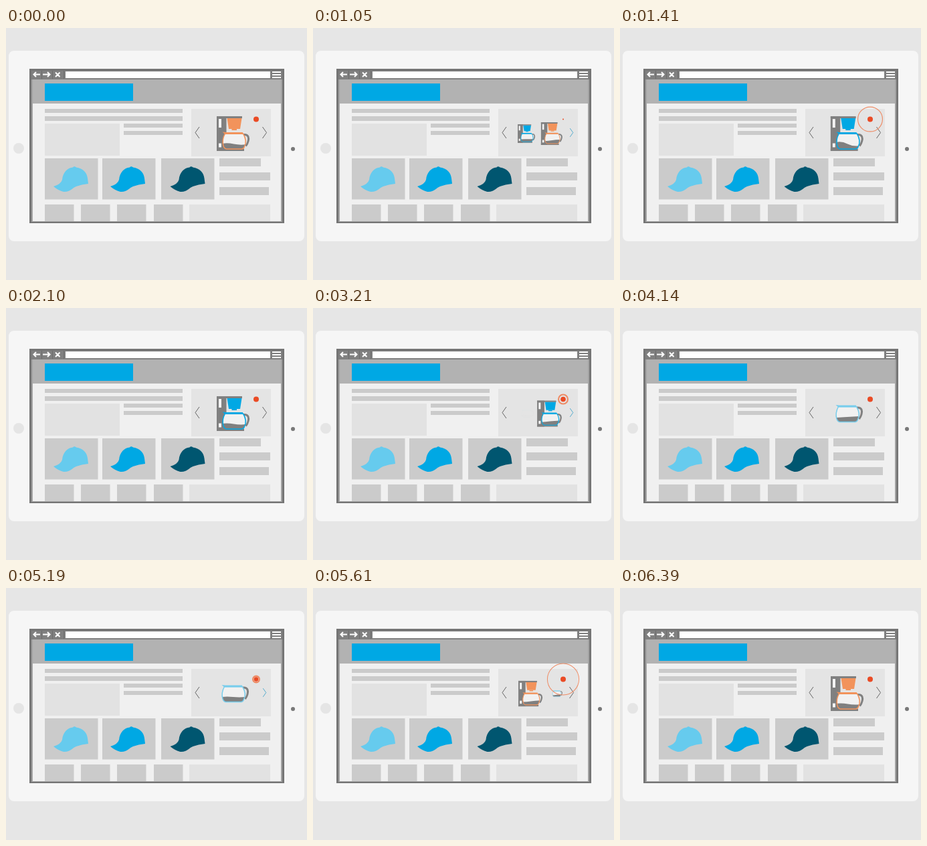
These frames come from a looping animation (450 px wide and 377 px high, 6420 ms). An HTML page with a canvas:

```html
<!DOCTYPE html>
<html>
<head>
<meta charset="utf-8">
<style>
html, body { margin: 0; width: 100%; height: 100%; overflow: hidden; background: #e6e6e6; }
canvas { display: block; }
</style>
</head>
<body>
<canvas id="stage" width="450" height="377"></canvas>
<script>
const c = document.getElementById('stage').getContext('2d');
const LOOP = 6420, GRAY = '#808080', BLUE = '#00a8e4', ORANGE = '#f2935b', PALE = '#78cdec';
const clamp = v => Math.max(0, Math.min(1, v));
const ease = v => (1 - Math.cos(Math.PI * clamp(v))) / 2;

function rect(color, x1, y1, x2, y2) {
  c.fillStyle = color;
  c.fillRect(x1, y1, x2 - x1, y2 - y1);
}
function fill(color, path) {
  c.fillStyle = color;
  c.fill(new Path2D(path));
}
function line(color, width, path) {
  c.strokeStyle = color;
  c.lineWidth = width;
  c.stroke(new Path2D(path));
}
function disc(color, x, y, r) {
  c.fillStyle = color;
  c.beginPath();
  c.arc(x, y, r, 0, 7);
  c.fill();
}

const CAP = 'M71 237Q82 234 84 227C85 216 92 209 100 208.500Q102 206 105 208.500C115 210 121 216 122 225L123 233Q113 234 105 237C99 239 96 246 86 245Q78 243 71 237Z';

function page() {
  rect('#e6e6e6', 0, 0, 450, 377);
  c.fillStyle = '#f6f6f6';
  c.beginPath();
  c.roundRect(4, 34, 442, 285, 8);
  c.fill();
  disc('#e5e5e5', 19, 180, 8);
  disc('#787878', 429, 181, 3);

  rect('#757575', 35, 61, 416, 292);
  rect('#a3a3a3', 38, 77, 413, 290);
  rect('#f0f0f0', 40, 77, 411, 289);
  rect('#b2b2b2', 40, 77, 411, 113);
  rect(BLUE, 58, 83, 190, 109);

  rect('#808080', 38, 64, 413, 77);
  rect('#fff', 89, 65, 395, 75);
  for (const x of [53, 69, 86]) rect('#6c6c6c', x, 64, x + 1, 76);
  for (const y of [65, 69, 73]) rect('#fff', 398, y, 411, y + 2);
  line('#fff', 2, 'M51 69.500H42M45 66L41.500 69.500L45 73M55 69.500H65M62 66L65.500 69.500L62 73M74 66.500L80.500 73M80.500 66.500L74 73');

  const bars = [
    [58, 121, 264, 127], [58, 132, 264, 139], [176, 143, 264, 149], [176, 154, 264, 160],
    [319, 195, 381, 207], [319, 216, 395, 228], [319, 238, 393, 250]
  ];
  for (const b of bars) rect('#cbcbcb', ...b);
  for (const x of [58, 112, 166, 221]) rect('#cbcbcb', x, 264, x + 43.5, 289);
  rect('#e2e2e2', 58, 143, 170, 191);
  rect('#e2e2e2', 274, 264, 395, 289);
  rect('#e4e4e4', 277, 121, 396, 192);

  [['#66cbee', 0], [BLUE, 85], ['#005670', 174.5]].forEach(([color, dx], i) => {
    const x = [58, 144, 232][i];
    rect('#cbcbcb', x, 195, x + 79.5, 256.5);
    c.save();
    c.translate(dx, 0);
    fill(color, CAP);
    c.restore();
  });
}

// Shapes below are centred on the carousel item.
const GLASS = 'M-16 -10.500H11C15 -4 16 3 13 9Q12 12 9 12.500H-14Q-17 12 -18.500 8C-20.500 1 -19 -5 -16 -10.500Z';

function pot(color, tilt) {
  line(GRAY, 3, 'M10 -9H13C19 -9 20 -4 18.500 1Q17.500 5 15 8');
  fill('#f1f1f1', GLASS);
  c.save();
  c.clip(new Path2D(GLASS));
  fill(GRAY, `M-21 ${5 - tilt}Q-12 ${4 - tilt * 1.5} -3 5T17 ${5 + tilt}V13H-21Z`);
  c.restore();
  line(color, 1.5, GLASS);
  fill(color, 'M-20 -13L-15 -12.500H10.500V-9.500H-16Z');
}

function machine(color, tilt) {
  rect(GRAY, -24.5, -26, -10, 26);
  rect(GRAY, -24.5, -26, 13.5, -23);
  rect(GRAY, -24.5, 22.5, 16.5, 26);
  rect('#f4f4f4', -21.5, -22, -17.5, -9);
  rect('#f4f4f4', -21.5, 14.5, -17.5, 20.5);
  fill(color, 'M-9 -23H13L10.500 -7H-6.500Z');
  rect(color, -2, -7, 5.5, -5);
  c.save();
  c.translate(4, 10.5);
  pot(color, tilt);
  c.restore();
}

const items = [
  { x: 339.5, draw: tilt => machine(ORANGE, tilt) },
  { x: 339.5, draw: tilt => machine(BLUE, tilt) },
  { x: 342.5, draw: tilt => pot(PALE, tilt) }
];
const slides = [[790, 650], [2910, 900], [5231, 650]];

function show(i, scale, side, tilt, alpha = 1) {
  if (scale <= 0.02 || alpha <= 0) return;
  c.save();
  c.globalAlpha = alpha;
  c.translate(items[i].x + side * 24 * (1 - scale ** 3), 158);
  c.scale(scale, scale);
  items[i].draw(tilt);
  c.restore();
}

function carousel(t) {
  let k = slides.findLastIndex(s => t >= s[0]);
  if (k < 0) {
    k = 2;
    t += LOOP;
  }
  const [start, span] = slides[k];
  const p = ease((t - start) / span);
  const rest = t - start - span;
  // The coffee keeps swaying after the item has stopped.
  const sway = 2.5 * Math.cos(rest / 95) * (rest > 0 ? Math.exp(-rest / 450) : p);
  show(k, 1 - p, 1, -2 * Math.sin(Math.PI * p));
  show((k + 1) % 3, 1 - 0.72 * (1 - p), -1, sway, clamp((p - 0.25) / 0.08));
}

function click(t) {
  const q = t < 810 ? -1 : (t - 810) % 2010;
  const press = ease(q / 150) * (1 - ease((q - 400) / 150));
  line('#666', 1, 'M289 148L283 156.500L289 165');
  c.save();
  c.translate(386.5, 156.5);
  c.scale(1 - press * 0.25, 1 - press * 0.25);
  line(press > 0.5 ? '#2499c4' : '#666', 1, 'M-3 -8.500L3 0L-3 8.500');
  c.restore();

  const g = clamp((q - 300) / 660);
  if (g > 0 && g < 1) {
    c.globalAlpha = clamp((1 - g) * 5);
    c.strokeStyle = '#ee8c66';
    c.lineWidth = 1 + 2 * (1 - g) ** 4;
    c.beginPath();
    c.arc(374, 136.5, 25 * (1 - (1 - g) ** 2.2), 0, 7);
    c.stroke();
    c.globalAlpha = 1;
  }
  disc('#ea4b25', 374, 136.5, 4 - 3 * ease(q / 240) * (1 - ease((q - 240) / 180)));
}

function frame(now) {
  const t = now % LOOP;
  page();
  carousel(t);
  click(t);
  requestAnimationFrame(frame);
}
frame(0);
</script>
</body>
</html>
```
